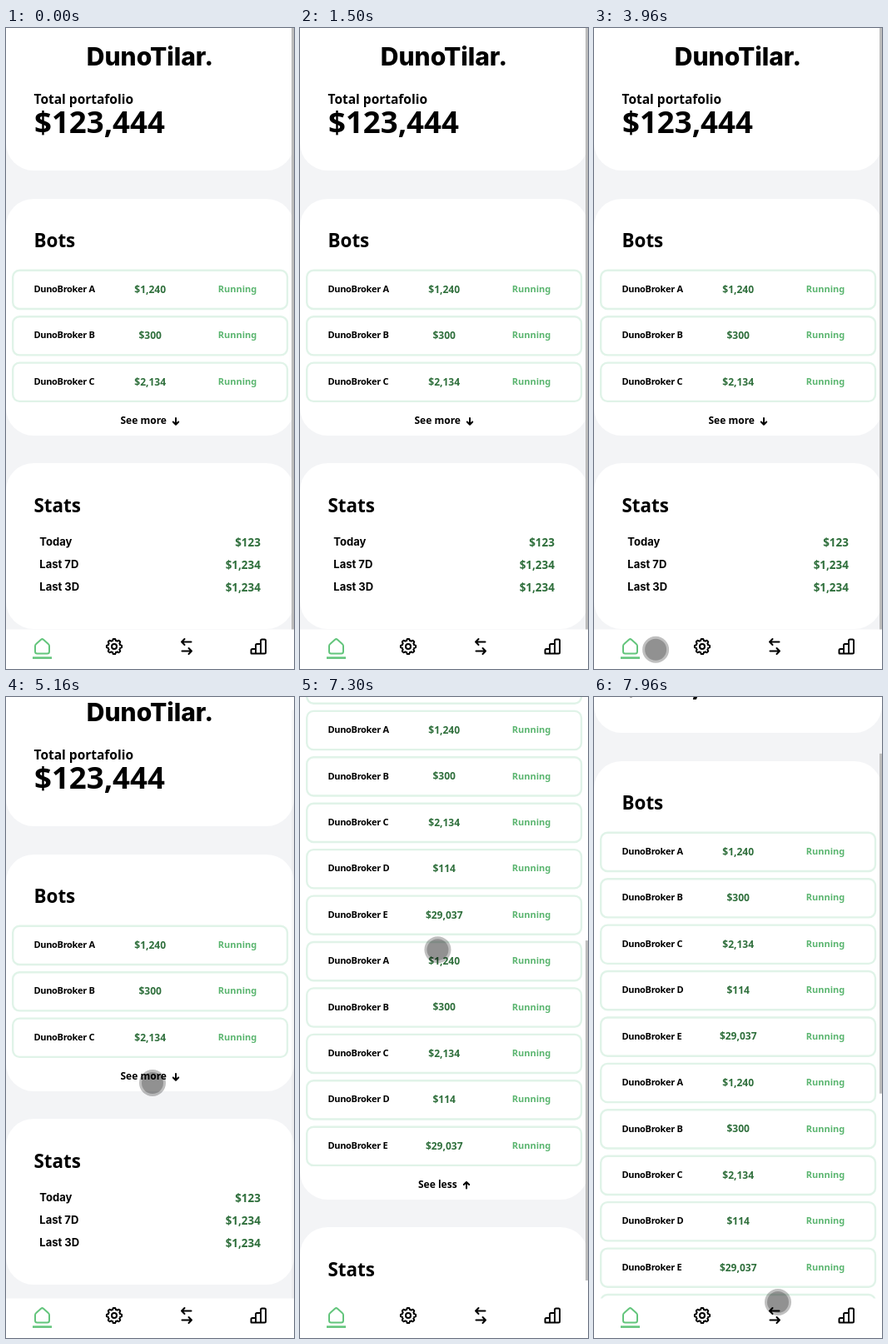
An HTML page for the animation above (8 s loop, 346 by 769 pixels).

```html
<!DOCTYPE html>
<html lang="en">
<head>
<meta charset="utf-8">
<title>Portfolio app</title>
<style>
  html, body { margin: 0; width: 100%; height: 100%; overflow: hidden; background: #fff; }
  svg { display: block; width: 346px; height: 769px; }
  text { font-family: "Noto Sans", sans-serif; font-weight: 700; fill: #000; }
  .brand { font: 800 30px Inter, sans-serif; text-anchor: middle; }
  .label { font-size: 15.5px; font-weight: 600; }
  .total { font-size: 36.6px; }
  .heading { font-size: 22.4px; }
  .bot { font-size: 11px; font-weight: 600; letter-spacing: -.03em; }
  .money { font-size: 12px; font-weight: 600; fill: #2f6f3c; text-anchor: middle; }
  .state { font-size: 11px; font-weight: 600; fill: #5ab56f; text-anchor: middle; }
  .more { font-size: 12px; font-weight: 600; }
  .period { font: 700 13px Inter, sans-serif; }
  .profit { font-size: 13.4px; font-weight: 600; fill: #2f6f3c; text-anchor: end; }
  .panel { fill: #fff; }
  .card { fill: #fff; stroke: #e0f3e8; stroke-width: 2.4; }
  .icon { fill: none; stroke: #000; stroke-width: 2; stroke-linecap: round; stroke-linejoin: round; }
  .active { stroke: #63c57c; }
</style>
</head>
<body>
<svg viewBox="0 0 346 769">
  <g id="app"></g>
  <g id="touch">
    <circle r="16" fill="#000" fill-opacity=".25"/>
    <circle r="13" fill="#000" fill-opacity=".24"/>
  </g>
</svg>
<script>
const LOOP = 8000, VIEW = 769, PITCH = 55.42, SHORT = 3, LONG = 15;
const SHORT_HEIGHT = 785, GROWTH = (LONG - SHORT) * PITCH;
const AMOUNTS = ["$1,240", "$300", "$2,134", "$114", "$29,037"];
const $ = id => document.getElementById(id);

const text = (cls, x, y, str) => `<text class="${cls}" x="${x}" y="${y}">${str}</text>`;
const panel = (id, y, h) => `<rect id="${id}" class="panel" y="${y}" width="346" height="${h}" rx="33"/>`;
const icon = (d, cls = "") => `<path class="icon ${cls}" d="${d}"/>`;

function botRow(i) {
  const y = 290.8 + i * PITCH, k = i % 5;
  return `<g class="row"><rect class="card" x="8.2" y="${y}" width="329.8" height="46.2" rx="8"/>
    ${text("bot", 33.5, y + 26.2, "DunoBroker " + "ABCDE"[k])}
    ${text("money", 173.2, y + 27, AMOUNTS[k])}
    ${text("state", 278, y + 26.2, "Running")}</g>`;
}

function gear(cx, cy) {
  const points = Array.from({ length: 96 }, (_, i) => {
    const a = i / 96 * Math.PI * 2;
    const r = 8.2 + Math.max(-.9, Math.min(.9, 1.8 * Math.cos(8 * a)));
    return `${(cx + r * Math.cos(a)).toFixed(2)},${(cy + r * Math.sin(a)).toFixed(2)}`;
  });
  return `<polygon class="icon" points="${points.join(" ")}"/>
    <circle class="icon" cx="${cx}" cy="${cy}" r="3"/>`;
}

const stats = [["Today", "$123"], ["Last 7D", "$1,234"], ["Last 3D", "$1,234"]];

$("app").innerHTML = `
  <rect width="346" height="769" fill="#f3f4f6"/>
  <g id="page">
    ${panel("header", -60, 231)}
    ${text("brand", 173, 44.5, "DunoTilar.")}
    ${text("label", 33.5, 91.3, "Total portafolio")}
    <g class="data">${text("total", 34, 126, "$123,444")}</g>
    ${panel("bots", 205, 284)}
    ${text("heading", 33.5, 263, "Bots")}
    <g class="data">
      ${Array.from({ length: LONG }, (_, i) => botRow(i)).join("")}
      <g id="seeMore">${text("more", 137.5, 474.5, "See more")}
        ${icon("M204 468V475.5M200.8 472.5L204 475.7L207.2 472.5")}</g>
      <g id="seeLess" transform="translate(0 ${GROWTH})">${text("more", 142, 474.5, "See less")}
        ${icon("M200 475.5V468M196.8 471L200 467.8L203.2 471")}</g>
    </g>
    <g id="stats">
      ${panel("statsPanel", 522, 199)}
      ${text("heading", 33.5, 580.5, "Stats")}
      <g class="data">${stats.map(([name, value], i) =>
        text("period", 40.3, 621.3 + 27 * i, name) + text("profit", 305.8, 622 + 26.8 * i, value)).join("")}</g>
    </g>
  </g>
  <rect id="thumb" x="343" width="3" fill="#bcbcbc"/>
  <rect y="721.5" width="346" height="48" fill="#fff"/>
  ${icon("M35 741.5Q35 740 36.2 739L42 733.7Q43.5 732.5 45 733.7L50.8 739Q52 740 52 741.5V748Q52 750.5 49.5 750.5H37.5Q35 750.5 35 748Z", "active")}
  <rect x="32" y="754.3" width="23" height="2.6" fill="#63c57c"/>
  ${gear(130, 742)}
  ${icon("M222.5 736.5H211M214.5 733L211 736.5L214.5 740M211.5 747.5H223M219.5 744L223 747.5L219.5 751")}
  ${icon("M294.5 750V746.5Q294.5 745 296 745H300V750.5H295Q294.5 750.5 294.5 750M300 750.5V740.5Q300 739 301.5 739H306V750.5H300M306 739V735Q306 733.5 307.5 733.5H310.5Q312 733.5 312 735V749Q312 750.5 310.5 750.5H306")}
`;

// Keys are [time, ...values], linear in between.
const touchKeys = [
  [2960, 316, 702], [3130, 240, 716], [3300, 130, 734], [3500, 64, 743], [3830, 64, 743],
  [3960, 74, 746], [4100, 90, 710], [4360, 132, 430], [4630, 156, 156], [4700, 160, 190],
  [4830, 170, 380], [4960, 176, 463], [5700, 176, 463], [5960, 183, 581], [6170, 183, 581],
  [6230, 178, 520], [6300, 162, 320], [6360, 144, 151], [7110, 144, 151], [7220, 154, 215],
  [7390, 178, 400], [7630, 205, 582], [7960, 221, 726]
];
const scrollKeys = [
  [4100, 0], [4250, 16], [6170, 16], [6230, 70], [6300, 270], [6360, 582], [6430, 681]
];
const thumbKeys = [
  [4960, 1], [5160, .12], [5499, .12], [5500, 0], [6190, 0], [6230, 1],
  [6720, 1], [6960, 0], [7120, 0], [7160, 1]
];

function sample(keys, t) {
  if (t <= keys[0][0]) return keys[0].slice(1);
  const next = keys.findIndex(k => k[0] > t);
  if (next < 0) return keys.at(-1).slice(1);
  const a = keys[next - 1], b = keys[next], p = (t - a[0]) / (b[0] - a[0]);
  return a.slice(1).map((v, i) => v + (b[i + 1] - v) * p);
}

const show = (el, on) => el.setAttribute("visibility", on ? "inherit" : "hidden");
const rows = [...document.querySelectorAll(".row")];
const data = [...document.querySelectorAll(".data")];

function draw(t) {
  const open = t >= 5500, loading = t >= 500 && t < 1500;
  const height = SHORT_HEIGHT + (open ? GROWTH : 0);
  const [x, y] = sample(touchKeys, t);
  // Dragging down moves the page along with the finger.
  const scroll = t < 7110 ? sample(scrollKeys, t)[0] : Math.min(681, 681 - (y - 173));

  $("app").setAttribute("opacity", t >= 500 && t < 900 ? Math.floor((t - 500) / 80) / 5 : 1);
  data.forEach(el => show(el, !loading));
  rows.forEach((el, i) => show(el, open || i < SHORT));
  show($("seeMore"), !open);
  show($("seeLess"), open);
  $("bots").setAttribute("height", 284 + (open ? GROWTH : 0));
  $("stats").setAttribute("transform", `translate(0 ${open ? GROWTH : 0})`);
  $("page").setAttribute("transform", `translate(0 ${-Math.round(scroll)})`);

  const thumb = $("thumb");
  thumb.setAttribute("y", scroll * VIEW / height);
  thumb.setAttribute("height", VIEW * VIEW / height);
  thumb.setAttribute("opacity", sample(thumbKeys, t)[0]);

  $("touch").setAttribute("transform", `translate(${x} ${y})`);
  $("touch").setAttribute("visibility", t >= 2960 ? "visible" : "hidden");
}

const start = performance.now();
function tick() {
  draw((performance.now() - start) % LOOP);
  requestAnimationFrame(tick);
}
tick();
</script>
</body>
</html>
```
